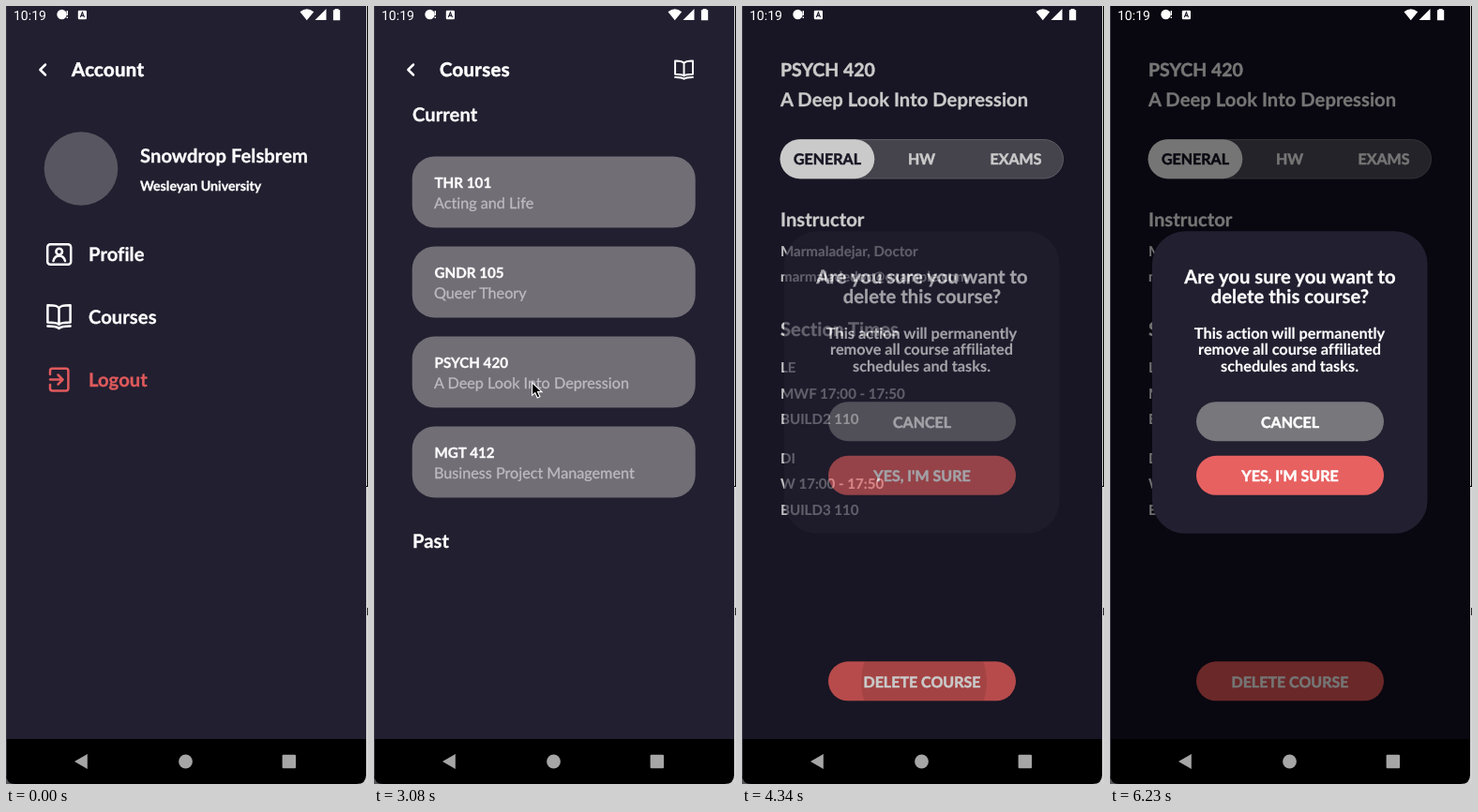
Write an HTML page that moves like this. It is 386 px wide and 830 px high and loops after 7 s.

```html
<!DOCTYPE html>
<html lang="en">
<head>
<meta charset="utf-8">
<title>Course planner</title>
<style>
html, body { margin: 0; width: 100%; height: 100%; overflow: hidden; background: #000; }
svg { display: block; width: 386px; height: 830px; }
text {
  font-family: Lato, "Open Sans", sans-serif;
  font-weight: 700;
  font-variant-ligatures: none;
  color: #fff;
  fill: currentColor;
  stroke: currentColor;
  stroke-width: .3px;
  text-rendering: geometricPrecision;
  white-space: pre;
}
.head { font-size: 20.3px; letter-spacing: .35px; stroke-width: .6px; }
.big { font-size: 20.2px; letter-spacing: .06px; }
.code { font-size: 19.5px; stroke-width: .5px; }
.card { font-size: 15.2px; }
.sub { font-size: 16.2px; font-weight: 400; color: #bcbac0; }
.body { font-size: 15.1px; color: #f2f1f4; stroke-width: .15px; }
.btn { font-size: 16px; text-anchor: middle; stroke-width: .5px; }
.mid { text-anchor: middle; }
.small { font-size: 14.2px; }
.note { font-size: 16.3px; text-anchor: middle; stroke-width: .15px; }
.line { fill: none; stroke: #fff; stroke-width: 2.5; stroke-linecap: round; stroke-linejoin: round; }
.status { font: 400 14px Roboto, sans-serif; stroke: none; }
</style>
</head>
<body>
<svg id="stage" viewBox="0 0 386 830"></svg>
<script>
const BG = '#221f30', RED = '#e86161', GREY = '#5a5763';

const text = (x, y, cls, str, extra = '') => `<text x="${x}" y="${y}" class="${cls}" ${extra}>${str}</text>`;
const box = (x, y, w, h, r, fill, extra = '') =>
  `<rect x="${x}" y="${y}" width="${w}" height="${h}" rx="${r}" fill="${fill}" ${extra}/>`;
const line = (d, extra = '') => `<path class="line" d="${d}" ${extra}/>`;
const pill = (y, fill, label) => box(92, y, 200, 42, 21, fill) + text(192, y + 27.3, 'btn', label);
const page = (id, body) =>
  `<g id="${id}">${box(0, 0, 384, 830, 0, BG)}${box(0, 782, 384, 48, 0, '#000')}${body}</g>`;

const back = line('M42 62.5L36.4 68L42 73.5');
const book = (x, y, s) => `<g transform="translate(${x} ${y}) scale(${s})">` +
  line('M13.5 4.5C12 1.8 9.5 1.2 1.4 1.2V19.5C8.5 19.5 11.5 19.8 13.5 21.8C15.5 19.8 18.5 19.5 25.6 19.5V1.2C17.5 1.2 15 1.8 13.5 4.5V21.5') +
  line('M1.4 23.6C8.5 23.6 11.5 24 13.5 26C15.5 24 18.5 23.6 25.6 23.6') + '</g>';

const account = page('account',
  back + text(70, 75, 'head', 'Account') +
  '<circle cx="80" cy="173.5" r="39.3" fill="#585660"/>' +
  text(143, 167, 'big', 'Snowdrop Felsbrem') +
  text(143, 197, 'small', 'Wesleyan University') +
  box(44.2, 254.2, 25, 21.6, 3, 'none', 'stroke="#fff" stroke-width="2.5"') +
  '<circle class="line" cx="56.7" cy="262" r="3.3"/>' +
  line('M50.5 272C51.5 268 54 266.5 56.7 266.5S62 268 63 272') +
  text(88, 272, 'big', 'Profile') +
  book(43, 318, 1) + text(88, 339, 'big', 'Courses') +
  line('M47 393V389.2Q47 386.8 49.4 386.8H64Q66.4 386.8 66.4 389.2V408Q66.4 410.4 64 410.4H49.4Q47 410.4 47 408V404M47 398.6H60M55.5 393.5L60.6 398.6L55.5 403.7',
    'style="stroke:#e05a5c"') +
  text(88, 406, 'big', 'Logout', 'style="color:#e05a5c"'));

const list = [
  ['THR 101', 'Acting and Life'],
  ['GNDR 105', 'Queer Theory'],
  ['PSYCH 420', 'A Deep Look Into Depression'],
  ['MGT 412', 'Business Project Management']
];
const courses = page('courses',
  back + text(70, 75, 'head', 'Courses') + book(320, 57.5, .78) +
  text(41, 123, 'big', 'Current') +
  list.map(([code, name], i) => {
    const y = 160.5 + 96 * i;
    return box(40.7, y, 302, 76, 24, '#716e76') +
      text(64.5, y + 33.7, 'card', code) + text(64, y + 55, 'sub', name);
  }).join('') +
  text(41, 578, 'big', 'Past'));

const facts = [
  [266.5, 'Marmaladejar, Doctor'], [293.5, 'marmaladedoc@example.com'],
  [391, 'LE'], [418.5, 'MWF 17:00 - 17:50'], [445.5, 'BUILD2 110'],
  [488, 'DI'], [515.3, 'W 17:00 - 17:50'], [542.5, 'BUILD3 110']
];
const detail = page('detail',
  text(41, 75, 'code', 'PSYCH 420') +
  text(41, 107.3, 'big', 'A Deep Look Into Depression') +
  box(41, 142.5, 301.5, 41.5, 20.75, GREY, 'stroke="#77747e" stroke-width="1"') +
  box(40.6, 142.2, 100.7, 42, 21, '#fff') +
  text(91, 169, 'btn', 'GENERAL', `style="color:${BG}"`) +
  text(191.5, 169, 'btn', 'HW') + text(292, 169, 'btn', 'EXAMS') +
  text(41, 235, 'big', 'Instructor') + text(41, 352, 'big', 'Section Times') +
  facts.map(([y, str]) => text(41, y, 'body', str)).join('') +
  box(92, 699.3, 200, 42, 21, RED) +
  '<g clip-path="url(#button)"><circle id="ripple" cx="194" cy="721" opacity="0"/></g>' +
  text(192, 726.5, 'btn', 'DELETE COURSE'));

const dialog = '<g id="dialog" opacity="0">' +
  box(45, 240.3, 293.5, 322.5, 35, BG) +
  text(192, 295.7, 'big mid', 'Are you sure you want to') +
  text(192, 317, 'big mid', 'delete this course?') +
  text(191.5, 355, 'note', 'This action will permanently') +
  text(191.5, 372.3, 'note', 'remove all course affiliated') +
  text(191.5, 389.6, 'note', 'schedules and tasks.') +
  pill(422.2, '#77777c', 'CANCEL') + pill(479.8, RED, "YES, I'M SURE") + '</g>';

const system =
  text(8, 14.7, 'status', '10:19') +
  '<g fill="#fff"><circle cx="59.5" cy="9" r="5.2"/>' +
  '<path d="M64.6 5h1.4v5h-1.4zM64.6 11.5h1.4v1.5h-1.4z"/>' +
  box(76.8, 4.8, 9.2, 9.4, 1.2, '#fff') +
  `<path d="M79.3 12L81.4 6.8L83.5 12M80 10.4H82.8" fill="none" stroke="${BG}" stroke-width="1.1"/>` +
  '<path d="M313.5 6.2Q320.8 .4 328.2 6.2L320.8 15.2Z"/><path d="M341.5 3V15H329.5Z"/>' +
  '<path d="M350.6 3H354.6V4.3H356.2V15.2H348.9V4.3H350.6Z"/></g>' +
  '<g fill="#a6a6a6"><path d="M73 806L86.8 798V814Z"/><circle cx="191.5" cy="806" r="7.4"/>' +
  box(294.6, 798.8, 14.4, 14.4, 1, '#a6a6a6') + '</g>';

const edge =
  '<path d="M0 820Q0 830 10 830H0Z" fill="#55545a"/><path d="M384 820Q384 830 374 830H386V820Z" fill="#cfcfcf"/>' +
  box(0, 0, 1, 822, 0, '#34323e') +
  box(384, 0, 2, 830, 0, '#d4d4d4') + box(385, 0, 1, 513, 0, '#000') +
  box(384, 512, 2, 1, 0, '#000') + box(385, 642, 1, 8, 0, '#222');

const cursor = '<path id="cursor" d="M.6 .8V14.4L3.8 11.6L6.2 17L8.9 15.8L6.5 10.6H11Z" fill="#000" stroke="#fff" stroke-width="1.1"/>';

document.getElementById('stage').innerHTML =
  '<defs><clipPath id="phone"><rect width="384" height="830"/></clipPath>' +
  '<clipPath id="button"><rect x="92" y="699.3" width="200" height="42" rx="21"/></clipPath></defs>' +
  `<g clip-path="url(#phone)">${account}${courses}${detail}</g>${dialog}${system}${edge}${cursor}`;

const el = Object.fromEntries(['account', 'courses', 'detail', 'dialog', 'ripple', 'cursor']
  .map(id => [id, document.getElementById(id)]));

const clamp = v => Math.min(1, Math.max(0, v));
const part = (t, from, to) => clamp((t - from) / (to - from));

function bezier(x1, y1, x2, y2) {
  const at = (a, b, s) => 3 * a * s * (1 - s) ** 2 + 3 * b * s * s * (1 - s) + s ** 3;
  return x => {
    let lo = 0, hi = 1;
    for (let i = 0; i < 24; i++) {
      const m = (lo + hi) / 2;
      if (at(x1, x2, m) < x) lo = m; else hi = m;
    }
    return at(y1, y2, (lo + hi) / 2);
  };
}
const rush = bezier(.05, 0, .1333, .06), settle = bezier(.2083, .82, .25, 1), easeOut = bezier(0, 0, .58, 1);
const zoom = u => u <= 0 ? 0 : u >= 1 ? 1 : u < 1 / 6 ? .4 * rush(u * 6) : .4 + .6 * settle((u - 1 / 6) * 1.2);

const LOOP = 7000;
const moves = [['account', 'courses', 1742, 2092], ['courses', 'detail', 3098, 3438]];
const pointers = [[1190, 1400, 124, 322], [3080, 3640, 168, 401], [5670, 6230, 247.5, 498]];

function place(id, scale, opacity) {
  const g = el[id];
  g.setAttribute('transform', `translate(192 415) scale(${scale}) translate(-192 -415)`);
  g.setAttribute('opacity', opacity);
  g.style.display = opacity > 0 ? '' : 'none';
}

function draw(t) {
  const shown = t < moves[0][3] ? 'account' : t < moves[1][3] ? 'courses' : 'detail';
  for (const id of ['account', 'courses', 'detail']) place(id, 1, id === shown ? 1 : 0);
  for (const [from, to, start, end] of moves) {
    if (t < start || t >= end) continue;
    const u = part(t, start, end), z = zoom(u);
    place(from, 1 + .05 * z, 1);
    place(to, .85 + .15 * z, part(u, .125, .25));
  }

  // The page behind the dialog dims while the dialog fades in.
  const d = part(t, 4214, 4514), p = d * d * (3 - 2 * d), c = 1 + .062 * p;
  el.detail.style.filter = p ? `brightness(${(1 - .51 * p) / c}) contrast(${c})` : 'none';
  el.dialog.setAttribute('opacity', d ? easeOut(d) : 0);

  const grow = part(t, 4190, 4480);
  el.ripple.setAttribute('r', 20 + 90 * grow);
  el.ripple.setAttribute('opacity', grow ? .1 * (1 - part(t, 4480, 5030)) : 0);

  const hit = pointers.find(([a, b]) => t >= a && t < b);
  el.cursor.style.display = hit ? '' : 'none';
  if (hit) el.cursor.setAttribute('transform', `translate(${hit[2]} ${hit[3]})`);
}

const begin = performance.now();
function tick() {
  draw((performance.now() - begin) % LOOP);
  requestAnimationFrame(tick);
}
tick();
</script>
</body>
</html>
```
